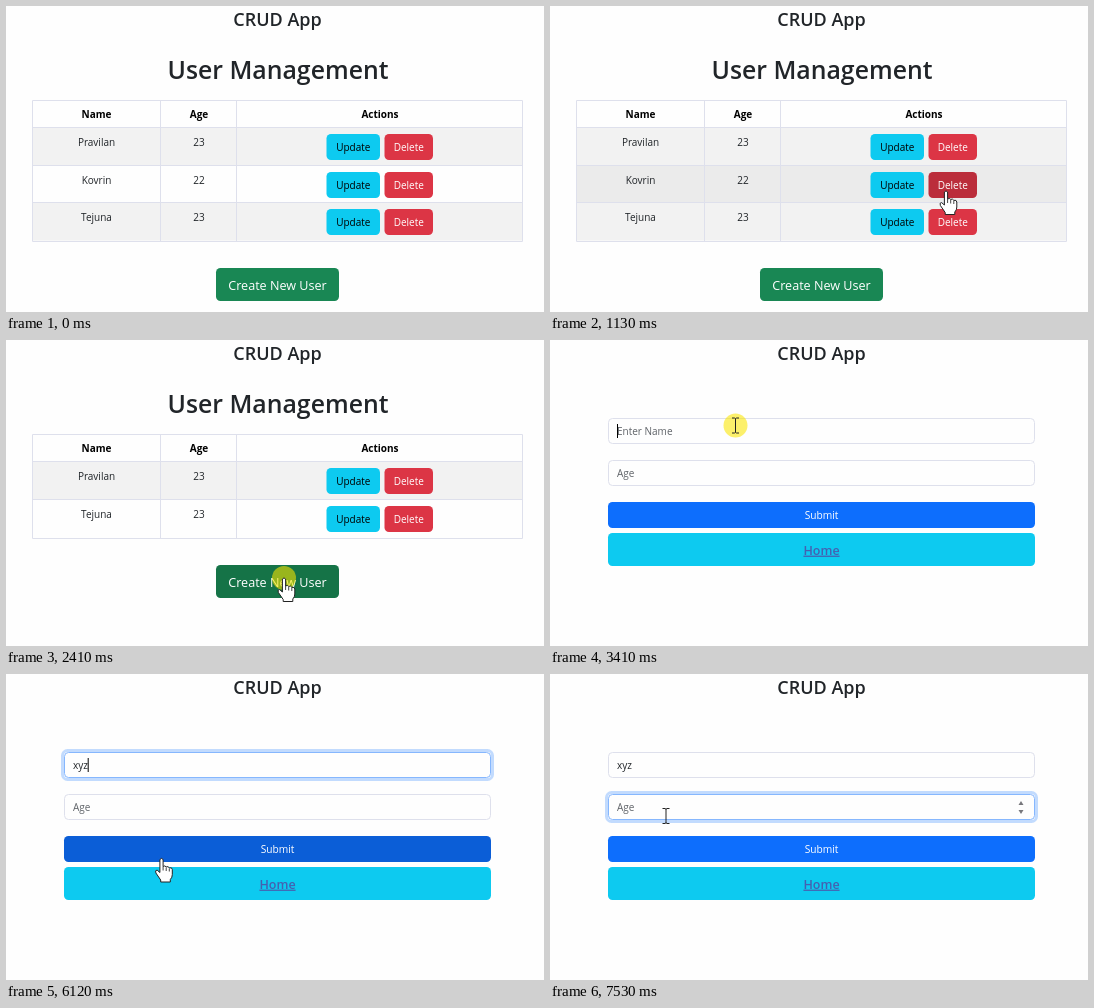
Recreate the animation shown at these times as an HTML page. Size 538 by 306 pixels, loop 8 s.

```html
<!DOCTYPE html>
<html lang="en">
<head>
<meta charset="utf-8">
<title>CRUD App</title>
<style>
  html, body { margin: 0; width: 100%; height: 100%; overflow: hidden; background: #fefefe; }
  svg { display: block; width: 100%; height: 100%; font: 10px "Open Sans", "Noto Sans", sans-serif; }
</style>
</head>
<body>
<svg id="stage" viewBox="0 0 538 306"></svg>
<script>
const stage = document.getElementById("stage");
const LOOP = 8000, TICK = 142.2, LEAD = 14; // the screen refreshes about 7 times a second
const INK = "#212529", LINE = "#dee0ec", STRIPE = "#f2f2f2", ROW_HOVER = "#ebebeb";
const CYAN = "#0dcaf0", RED = "#dc3545", GREEN = "#198754", BLUE = "#0d6efd";
const ROW_TOP = 122, ROW_HEIGHT = 37.5;
const PEOPLE = [["Pravilan", 23], ["Kovrin", 22], ["Tejuna", 23]];

// Pointer path: tick, x, y
const PATH = [
  [2, 486, 284], [8, 396, 185], [13, 396, 185], [15, 278, 238], [18, 278, 238],
  [23, 185.5, 85.5], [25, 185.5, 85.5], [28, 208, 226], [39, 208, 226], [41, 161, 245],
  [43, 155.5, 184.5], [44, 155.5, 184.5], [47, 116, 142], [57, 116, 142]
];
// Click highlight: first tick, end tick
const CLICKS = [[10, 12], [17, 18], [24, 25], [48, 49]];

const within = (tick, [from, to]) => tick >= from && tick < to;
const inside = (p, b) => p && p.x >= b.x && p.x <= b.x + b.w && p.y >= b.y && p.y <= b.y + b.h;
const box = (x, y, w, h) => ({ x, y, w, h });

function pointerAt(tick) {
  if (tick < PATH[0][0]) return null;
  const i = PATH.findIndex(key => key[0] > tick);
  const [t0, x0, y0] = PATH[i - 1], [t1, x1, y1] = PATH[i];
  const k = (tick - t0) / (t1 - t0);
  return { x: x0 + (x1 - x0) * k, y: y0 + (y1 - y0) * k };
}

const text = (label, x, y, size = 10, attrs = "", fill = INK) =>
  `<text x="${x}" y="${y}" font-size="${size}" fill="${fill}" text-anchor="middle" ${attrs}>${label}</text>`;
const rect = (b, fill, radius = 0, attrs = "") =>
  `<rect x="${b.x}" y="${b.y}" width="${b.w}" height="${b.h}" rx="${radius}" fill="${fill}" ${attrs}/>`;
const path = (d, stroke = LINE, fill = "none", attrs = "") =>
  `<path d="${d}" stroke="${stroke}" fill="${fill}" ${attrs}/>`;

function button(b, label, fill, hoverFill, pointer, size = 10, color = "#fff", attrs = "") {
  return rect(b, inside(pointer, b) ? hoverFill : fill, 4.5) +
    text(label, b.x + b.w / 2, b.y + b.h / 2 + size * 0.41, size, attrs, color);
}

function tablePage(tick, pointer) {
  const people = tick < 11 ? PEOPLE : PEOPLE.filter((_, i) => i !== 1);
  const bottom = Math.round(ROW_TOP + people.length * ROW_HEIGHT + 1.5);
  const create = box(210, bottom + 26, 123, 33);
  const hot = [create];
  let out = text("User Management", 272, 73, 24.8, 'font-weight="600"');

  people.forEach(([name, age], i) => {
    const y = Math.round(ROW_TOP + i * ROW_HEIGHT);
    const row = box(26.5, y, 490, ROW_HEIGHT);
    const update = box(320.5, y + 6, 53.5, 26), remove = box(378.5, y + 6, 48.5, 26);
    hot.push(update, remove);
    if (inside(pointer, row)) out += rect(row, ROW_HOVER);
    else if (i % 2 === 0) out += rect(row, STRIPE);
    out += path(`M26.5 ${y - 0.5}h490`) +
      text(name, 90.5, y + 17.5) + text(age, 193, y + 17.5) +
      button(update, "Update", CYAN, "#31d2f2", pointer, 10, "#000") +
      button(remove, "Delete", RED, "#bb2d3b", pointer);
  });

  out += path(`M26.5 94.5h490V${bottom - 0.5}h-490zM154.5 94.5V${bottom}M230.5 94.5V${bottom}`);
  [["Name", 90.5], ["Age", 193], ["Actions", 374]].forEach(([label, x]) => {
    out += text(label, x, 112, 10, 'font-weight="700"', "#000");
  });
  out += button(create, "Create New User", GREEN, "#157347", pointer, 12.6);
  return { out, hot, fields: [] };
}

function field(b, value, hint, focused, caret) {
  const ring = focused ? rect(box(b.x - 2, b.y - 2, b.w + 4, b.h + 4), "none", 5, 'stroke="#c2dbfe" stroke-width="3"') : "";
  const x = 67, y = b.y + 16.5;
  return ring + rect(b, "#fefefe", 4, `stroke="${focused ? "#86b7fe" : LINE}"`) +
    `<text x="${x}" y="${y}" fill="${value ? INK : "#5f6368"}">${value || hint}</text>` +
    (caret ? path(`M${x + 0.5 + value.length * 4.9} ${y - 11}v14`, "#000") : "");
}

function formPage(tick, pointer) {
  const name = box(58.5, 78.5, 426, 25), age = box(58.5, 120.5, 426, 25);
  const submit = box(58, 162, 427, 26), home = box(58, 193, 427, 33);
  const typed = "xyz".slice(0, [32, 33, 36].filter(t => tick >= t).length);
  const out =
    field(name, typed, "Enter Name", within(tick, [25, 48]), within(tick, [24, 48])) +
    field(age, "", "Age", tick >= 48, within(tick, [48, 53])) +
    (inside(pointer, age) ? path("M468.5 131l2.5-4 2.5 4zM468.5 136l2.5 4 2.5-4z", "none", "#77777c") : "") +
    button(submit, "Submit", BLUE, "#0b5ed7", pointer, 10.2) +
    button(home, "Home", CYAN, "#31d2f2", pointer, 12.5, "#4560b0",
      'font-weight="600" text-decoration="underline"');
  return { out, hot: [submit, home], fields: [name, age] };
}

const CURSORS = {
  arrow: path("M0 0V16L3.8 12.5 6.5 18.6 9.2 17.4 6.5 11.5H11.5Z", "#222", "#fff"),
  hand: path("M-1.6 1Q0-1.2 1.6 1V8Q3.4 6.6 4.7 8.4 6.7 7.4 7.8 9.4 10.6 8.6 10.8 11V16Q10.8 19 8.8 21V23.5H-.8V21.5L-5.6 14.5Q-6.8 11.6-4.4 11.6L-1.6 14Z", "#222", "#fff") +
    path("M1.6 8v4M4.7 9v3.5M7.8 10v3", "#444"),
  beam: path("M-3.5-7.5H-1L0-6.8 1-7.5H3.5M0-7V7M-3.5 7.5H-1L0 6.8 1 7.5H3.5", "#222")
};

function pointerMark(tick, { x, y }, page) {
  const over = boxes => boxes.some(b => inside({ x, y }, b));
  const shape = over(page.hot) ? "hand" : over(page.fields) ? "beam" : "arrow";
  const glow = CLICKS.some(span => within(tick, span))
    ? `<circle cx="${x}" cy="${y}" r="12" fill="#fae600" fill-opacity=".58"/>` : "";
  return glow + `<g transform="translate(${x} ${y})">${CURSORS[shape]}</g>`;
}

function draw(tick) {
  const pointer = pointerAt(tick);
  const page = (tick < 18 ? tablePage : formPage)(tick, pointer);
  stage.innerHTML = text("CRUD App", 271.5, 20, 18, 'font-weight="600"') + page.out +
    (pointer ? pointerMark(tick, pointer, page) : "");
}

let shown = -1;
function frame() {
  const tick = Math.floor((performance.now() % LOOP + LEAD) / TICK);
  if (tick !== shown) draw(shown = tick);
  requestAnimationFrame(frame);
}
frame();
</script>
</body>
</html>
```
